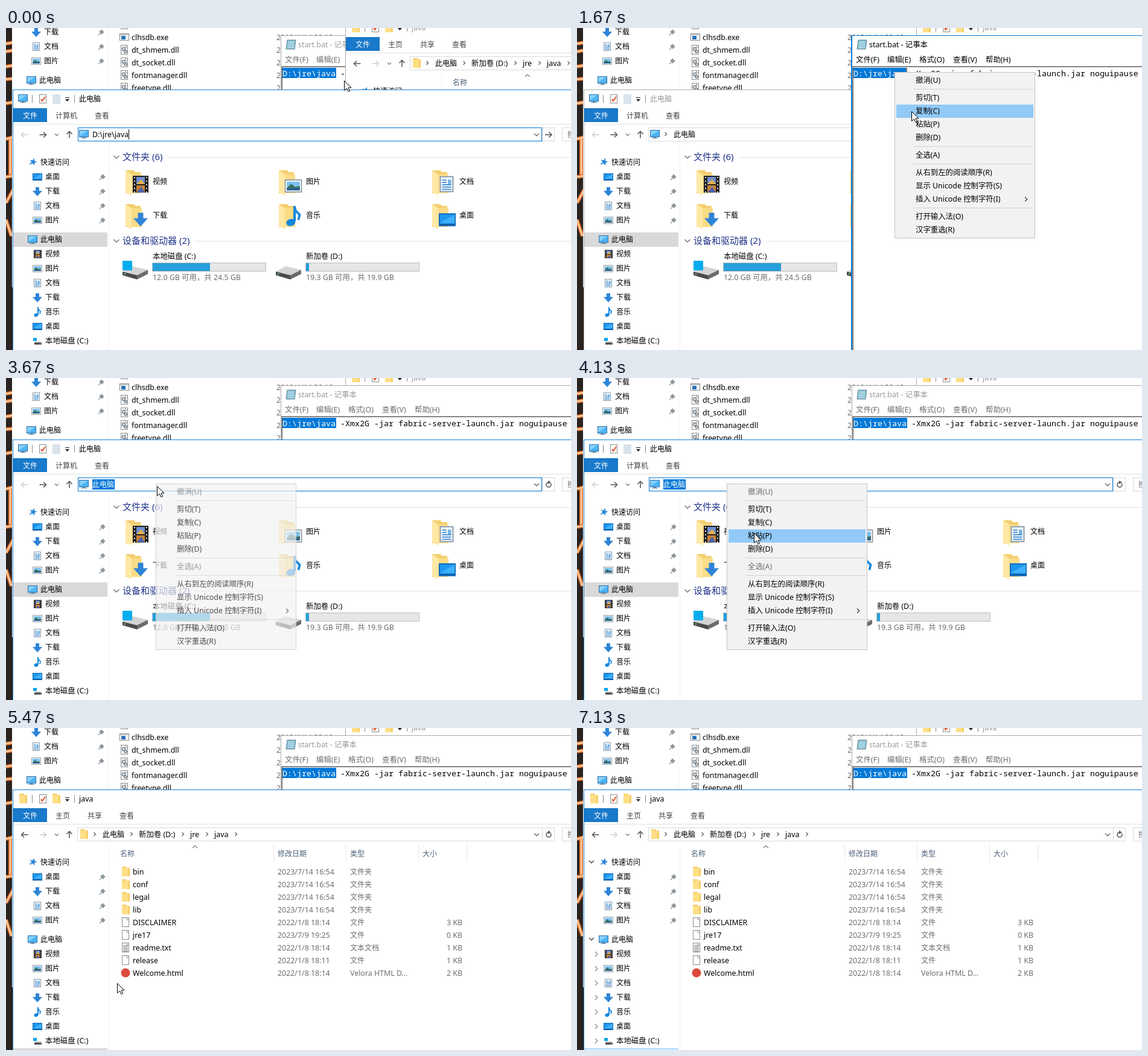
Write an HTML page with a canvas that moves like this. It is 936x534 px and loops after 7.47 s.

```html
<!DOCTYPE html>
<html lang="zh-CN">
<head>
<meta charset="utf-8">
<style>
html, body { margin: 0; width: 100%; height: 100%; overflow: hidden; background: #fff; }
canvas { display: block; }
</style>
</head>
<body>
<canvas id="stage" width="936" height="534"></canvas>
<script>
const g = document.getElementById('stage').getContext('2d');
const LOOP = 7470, STEP = 200 / 3;
const BLUE = '#0078d7', GREY = '#6d6d6d', DARK = '#5a5a5a';
const SANS = '"Noto Sans", "Open Sans", "Noto Sans CJK SC", "Noto Sans CJK", sans-serif';

// drawing helpers
function rect(x, y, w, h, c) { g.fillStyle = c; g.fillRect(x, y, w, h); }
function frame(x, y, w, h, c, fill) {
  if (fill) rect(x, y, w, h, fill);
  g.strokeStyle = c; g.lineWidth = 1;
  g.strokeRect(x + .5, y + .5, w - 1, h - 1);
}
function path(p) {
  g.beginPath();
  for (let i = 0; i < p.length; i += 2) g.lineTo(p[i], p[i + 1]);
}
function line(p, c, w = 1) { path(p); g.strokeStyle = c; g.lineWidth = w; g.stroke(); }
function poly(p, c) { path(p); g.fillStyle = c; g.fill(); }
function disc(x, y, r, c) { g.beginPath(); g.arc(x, y, r, 0, 7); g.fillStyle = c; g.fill(); }
function text(s, x, y, c = '#000', size, align = 'left') {
  g.font = (size || (/[ -~]/.test(s) ? 12.4 : 12)) + 'px ' + SANS;
  g.textAlign = align;
  g.fillStyle = c;
  g.fillText(s, x, y + 5);
}
function at(x, y, k, draw) {
  g.save(); g.translate(x, y); g.scale(k, k); draw(); g.restore();
}
const right = (x, y, c = DARK, r = 3) => line([x - r / 2, y - r, x + r / 2, y, x - r / 2, y + r], c, 1.2);
const down = (x, y, c = DARK, r = 4) => line([x - r, y - r / 2, x, y + r / 2, x + r, y - r / 2], c, 1.2);
const up = (x, y, c = DARK, r = 4) => down(x, y, c, -r);

// icons centred on the origin
const icons = {
  pc() {
    frame(-8, -7, 16, 12, '#2b6ea8', '#4db4f5');
    poly([-7, -6, 7, -6, -7, 3], '#86d0fb');
    rect(-2, 5, 4, 2, '#7c97ad'); rect(-5, 6, 10, 1, '#5d7c96');
  },
  desk() {
    frame(-8, -6, 16, 12, '#1267b5', '#1b97f0');
    poly([-7, 3, 7, -5, 7, 3], '#3fb0fa');
    rect(-7, 4, 14, 1, '#0b4f94');
  },
  down() { poly([-3, -7, 3, -7, 3, -1, 8, -1, 0, 8, -8, -1, -3, -1], '#2f84d8'); },
  doc() {
    frame(-6, -7, 12, 14, '#8296a8', '#fff');
    for (let y = -4; y < 6; y += 2) rect(-4, y, y < 0 ? 4 : 8, 1, '#3d8bd0');
    rect(1, -4, 3, 4, '#77b5e6');
  },
  pic() {
    frame(-8, -6, 16, 12, '#909aa2', '#fff');
    rect(-6, -4, 12, 8, '#7cc0ee');
    poly([-6, 2, -2, -2, 2, 1, 6, 0, 6, 4, -6, 4], '#3d7057');
    rect(-6, 2, 12, 2, '#28629c');
  },
  film() {
    rect(-6, -7, 13, 14, '#222');
    rect(-3, -6, 7, 6, '#6f8fd6'); rect(-3, 1, 7, 6, '#c98434');
    poly([-3, 0, 1, -4, 4, 0], '#e4b04c'); poly([-3, 7, 1, 2, 4, 7], '#4c63a8');
    for (let y = -6; y < 7; y += 3) { rect(-5, y, 1, 1, '#ddd'); rect(5, y, 1, 1, '#ddd'); }
  },
  note() {
    line([1, -8, 1, 4], '#1687dc', 2);
    line([1, -7, 2, -4, 5, -1, 4, 3], '#1687dc', 1.8);
    g.beginPath(); g.ellipse(-2, 5, 3.6, 2.8, -.3, 0, 7); g.fillStyle = '#1687dc'; g.fill();
  },
  star() {
    const p = [];
    for (let i = 0; i < 10; i++) {
      const a = i * Math.PI / 5 - 1.3, r = i % 2 ? 2.8 : 6.5;
      p.push(r * Math.cos(a), r * Math.sin(a));
    }
    poly(p, '#2a87d8');
    line([-7, 3, -3, 2], '#7db8e8'); line([-6, 5, -3, 4], '#7db8e8');
  },
  folder() {
    rect(-6, -8, 8, 4, '#f3cd68'); rect(-6, -6, 13, 14, '#ffdf86');
    rect(4, -6, 3, 14, '#f6cf68');
  },
  page() { frame(-6, -8, 12, 16, '#8c8c8c', '#fff'); line([2, -8, 2, -4, 6, -4], '#8c8c8c'); },
  txt() { icons.page(); for (let y = -4; y < 7; y += 2) rect(-4, y, 8, 1, '#8a8a8a'); },
  gear() {
    icons.page();
    g.strokeStyle = '#858f98'; g.lineWidth = 2;
    g.beginPath(); g.arc(-1, -1, 2.4, 0, 7); g.stroke();
    g.beginPath(); g.arc(2, 3, 2, 0, 7); g.stroke();
  },
  exe() { frame(-8, -6, 16, 12, '#8a8a8a', '#fff'); rect(-7, -5, 14, 2, '#c8c8c8'); rect(-5, -2, 7, 6, '#2b72b8'); },
  web() { disc(0, 0, 7.5, '#dd4b3e'); },
  check() {
    frame(-6, -7, 12, 15, '#8d8d8d', '#fff');
    line([-3, 1, -1, 4, 4, -3], '#e0502a', 2);
  },
  pin() {
    poly([0, -5, 5, 0, 3, 1, 1, 4, -4, -1, -1, -3], '#8d969d');
    line([-1, 1, -5, 5], '#8d969d', 1.3);
  },
  disk() {
    rect(-7, -5, 6, 5, '#00a3e8');
    poly([-6, 1, 5, 1, 7, 3, -4, 3], '#b8b8b8'); rect(-5, 3, 12, 3, '#4a4a4a');
    rect(4, 4, 2, 1, '#5fd35f');
  },
  drive() {
    poly([-20, 0, -4, -9, 22, -3, 4, 6], '#d4d4d4');
    poly([-20, 0, 4, 6, 4, 13, -20, 6], '#4a4a4a');
    poly([4, 6, 22, -3, 22, 4, 4, 13], '#6b6b6b');
    disc(-16, 4, 1.2, '#6be06b');
  },
  bigFolder() {
    poly([-18, -20, -4, -20, -2, -17, 7, -17, 7, 18, -18, 18], '#f4cf70');
    poly([-18, -20, -8, -13, -8, 22, -18, 16], '#ffe8a4');
    rect(-8, -13, 17, 31, '#fbdc86');
  }
};
const icon = (name, x, y, k = 1) => at(x, y, k, icons[name]);

const quick = [['desk', '桌面'], ['down', '下载'], ['doc', '文档'], ['pic', '图片']];
const places = [['film', '视频'], ['pic', '图片'], ['doc', '文档'], ['down', '下载'],
  ['note', '音乐'], ['desk', '桌面'], ['disk', '本地磁盘 (C:)']];

function sidebar(s) {
  if (s.pcRow) rect(12, 339, 156, 24, '#d9d9d9');
  icon('star', 45, 222); text('快速访问', 57, 222);
  quick.forEach(([n, label], i) => {
    const y = 246 + i * 24;
    icon(n, 52, y + 1); text(label, 65, y); icon('pin', 160, y + 1);
  });
  icon('pc', 44, 351); text('此电脑', 57, 350);
  places.forEach(([n, label], i) => {
    const y = 374 + i * 24;
    icon(n, 52, y + 1); text(label, 65, y);
  });
  rect(170, 195, 1, 400, '#f1f1f1');
  if (s.chev) {
    g.globalAlpha = s.chev;
    down(24, 222, '#333'); down(24, 350, '#333');
    places.forEach((_, i) => right(32, 375 + i * 24, '#8a8a8a', 4));
    g.globalAlpha = 1;
  }
  if (s.java) {
    rect(12, 531, 156, 10, s.hot ? '#cce8ff' : '#d9d9d9');
    if (s.hot) rect(12, 531, 156, 1, '#99d1ff');
  }
}

function group(label, y, x) {
  down(183, y, '#666', 4.5);
  text(label, 193, y, '#1e3287', 15);
  rect(x, y, 800, 1, '#e2e2e2');
}

function drive(x, label, used, info) {
  icon('drive', x - 29, 404);
  text(label, x + 1, 378);
  frame(x, 389, 189, 15, '#bcbcbc', '#e6e6e6');
  rect(x + 1, 390, used, 13, '#26a0da');
  text(info, x + 1, 413, GREY);
}

function pcView() {
  group('文件夹 (6)', 214, 268);
  [['film', '视频', 6, 3, 2], ['pic', '图片', 6, 6, 1.8], ['doc', '文档', 6, 3, 1.9],
   ['down', '下载', 7, 5, 1.5], ['note', '音乐', 6, 0, 2.1], ['desk', '桌面', 7, 6, 1.75]
  ].forEach(([n, label, dx, dy, k], i) => {
    const x = 216 + i % 3 * 254, y = 256 + (i > 2 ? 56 : 0);
    icon('bigFolder', x, y);
    icon(n, x + dx, y + dy, k);
    text(label, x + 27, y - 2);
  });
  group('设备和驱动器 (2)', 353, 312);
  drive(242, '本地磁盘 (C:)', 95, '12.0 GB 可用，共 24.5 GB');
  rect(193, 386, 16, 16, '#00adef');
  drive(496, '新加卷 (D:)', 5, '19.3 GB 可用，共 19.9 GB');
}

const files = [
  ['folder', 'bin', '2023/7/14 16:54', '文件夹', ''],
  ['folder', 'conf', '2023/7/14 16:54', '文件夹', ''],
  ['folder', 'legal', '2023/7/14 16:54', '文件夹', ''],
  ['folder', 'lib', '2023/7/14 16:54', '文件夹', ''],
  ['page', 'DISCLAIMER', '2022/1/8 18:14', '文件', '3 KB'],
  ['page', 'jre17', '2023/7/9 19:25', '文件', '0 KB'],
  ['txt', 'readme.txt', '2022/1/8 18:14', '文本文档', '1 KB'],
  ['page', 'release', '2022/1/8 18:11', '文件', '1 KB'],
  ['web', 'Welcome.html', '2022/1/8 18:14', 'Velora HTML D...', '2 KB']];

function listView(s) {
  if (s.head) {
    rect(172, 195, 271, 27, '#d9ebf9');
    rect(428, 195, 1, 27, '#a9cfec'); rect(443, 195, 1, 27, '#a9cfec');
    down(435.5, 208, DARK, 3);
  }
  up(313, 197, '#777');
  [['名称', 189], ['修改日期', 450], ['类型', 570], ['大小', 690]].forEach(([h, x]) => text(h, x, 208, '#4c607a'));
  [443, 563, 683, 763].forEach(x => rect(x, 194, 1, 28, '#e5e5e5'));
  files.forEach(([n, name, date, type, size], i) => {
    const y = 238 + i * 21;
    icon(n, 198, y);
    text(name, 210, y);
    text(date, 450, y, GREY);
    text(type, 570, y, GREY);
    text(size, 756, y, GREY, 0, 'right');
  });
}

function arrow(x, y, dir, c) {
  at(x, y, 1, () => {
    g.rotate(dir);
    line([-5.5, 0, 5.5, 0], c, 1.6); line([1, -4.5, 5.5, 0, 1, 4.5], c, 1.6);
  });
}

function address(s) {
  const focus = s.addr !== 'idle';
  if (focus) frame(119, 165, 769, 23, BLUE, '#fff');
  else frame(118, 165, 771, 23, '#d9d9d9', '#fff');
  icon(s.java ? 'folder' : 'pc', 129, 176);
  if (s.addr === 'typed') {
    text('D:\\jre\\java', 143, 176);
    rect(203, 168, 1, 17, '#000');
  } else if (s.addr === 'sel') {
    rect(143, 168, 37, 17, BLUE);
    text('此电脑', 143, 176, '#fff');
  } else {
    right(147, 176); text('此电脑', 160, 176);
    if (s.java) {
      right(208, 176); text('新加卷 (D:)', 220, 176);
      right(293, 176); text('jre', 305, 176);
      right(333, 176); text('java', 345, 176);
      right(381, 176);
    }
  }
  down(879, 177);
  frame(888, 165, 21, 23, '#d9d9d9');
  if (s.addr === 'typed') arrow(898.5, 177, 0, DARK);
  else {
    g.beginPath(); g.arc(899, 177, 4, -.6, 4.9); g.strokeStyle = DARK; g.lineWidth = 1.5; g.stroke();
    poly([898, 170, 903, 173, 898, 176], DARK);
  }
  if (focus) rect(887, 165, 1, 23, BLUE);
  frame(921, 165, 300, 23, '#d9d9d9');
  text('搜索', 930, 176, GREY);
}

function explorer(s, dx = 0, dy = 0) {
  g.save();
  g.translate(dx, dy);
  frame(11, 102, 1200, 700, s.active ? '#1883d7' : '#aaa', '#fff');
  icon(s.java ? 'folder' : 'pc', 28, 117);
  rect(43, 111, 1, 13, '#888'); rect(113, 111, 1, 13, '#888');
  icon('check', 61, 117);
  if (s.java) icon('folder', 83, 117); else rect(77, 110, 13, 16, '#d9e3ec');
  rect(98, 115, 7, 1, '#222'); poly([98, 118, 105, 118, 101.5, 122], '#222');
  text(s.java ? 'java' : '此电脑', 121, 117, s.active ? '#000' : '#999');
  rect(12, 133, 56, 23, '#1979ca');
  text('文件', 28, 145, '#fff');
  (s.java ? [['主页', 82], ['共享', 135], ['查看', 188]] : [['计算机', 82], ['查看', 147]])
    .forEach(([m, x]) => text(m, x, 145, '#444'));
  rect(12, 159, 1000, 1, '#dfe0e1');
  arrow(31, 177, Math.PI, s.java ? DARK : '#d0d0d0');
  arrow(61, 177, 0, s.java ? '#d0d0d0' : DARK);
  down(84, 177, '#777', 3);
  arrow(105, 177, -Math.PI / 2, DARK);
  address(s);
  sidebar(s);
  if (!s.java) pcView(); else if (!s.blank) listView(s);
  g.restore();
}

function backdrop() {
  rect(0, 0, 12, 534, '#2a2320');
  [[0, 26, 12, 24], [0, 39, 12, 37], [0, 64, 12, 62], [0, 85, 12, 84], [0, 125, 12, 123],
   [0, 184, 12, 181], [7, 184, 7, 245], [0, 247, 12, 245], [0, 290, 12, 268], [0, 318, 9, 345]].forEach(p => {
    line(p, '#e5722f', 6); line(p, '#fdd0a4', 2.5);
  });
  rect(10, 0, 700, 430, '#fff');
  at(-2, -264, 1, () => sidebar({}));
  text('2019/4/14 20:10', 448, 15, GREY);
  ['clhsdb.exe', 'dt_shmem.dll', 'dt_socket.dll', 'fontmanager.dll', 'freetype.dll'].forEach((f, i) => {
    const y = 15 + i * 21;
    icon(i ? 'gear' : 'exe', 196, y);
    text(f, 208, y);
    if (i) text('2019/4/14 20:10', 448, y, GREY);
  });
  icon('gear', 196, -6);
}

function notepad(active) {
  const c = active ? '#000' : GREY;
  frame(455, 12, 700, 700, active ? BLUE : '#aaa', '#fff');
  if (active) rect(454, 12, 1, 530, BLUE);
  poly([466, 20, 480, 20, 478, 35, 464, 35], '#8cc4d8');
  line([466, 20, 480, 20, 478, 35, 464, 35, 466, 20], '#5b7f8f');
  for (let y = 23; y < 33; y += 3) line([467, y + .5, 477, y + .5], '#c9e6f0');
  text('start.bat - 记事本', 484, 27, active ? '#000' : '#999');
  [['文件(F)', 462], ['编辑(E)', 514], ['格式(O)', 567], ['查看(V)', 623], ['帮助(H)', 677]]
    .forEach(([m, x]) => text(m, x, 52, c));
  // sunken edge of the text area
  frame(456, 63, 690, 640, '#a0a0a0');
  frame(457, 64, 690, 640, '#696969');
  rect(458, 66, 89, 17, BLUE);
  g.font = '13.333px "Noto Sans Mono", "Liberation Mono", monospace';
  g.textAlign = 'left';
  g.fillStyle = '#fff'; g.fillText('D:\\jre\\java', 458, 80);
  g.fillStyle = '#000'; g.fillText('-Xmx2G -jar fabric-server-launch.jar noguipause', 554, 80);
  if (active) rect(546, 66, 1, 17, '#ff8728');
}

const items = [['撤消(U)', 13], ['剪切(T)', 42], ['复制(C)', 64], ['粘贴(P)', 86], ['删除(D)', 108],
  ['全选(A)', 137], ['从右到左的阅读顺序(R)', 166], ['显示 Unicode 控制字符(S)', 188],
  ['插入 Unicode 控制字符(I)', 210], ['打开输入法(O)', 239], ['汉字重选(R)', 261]];

function menu(x, y, cur, off, alpha) {
  g.globalAlpha = Math.min(1, alpha);
  frame(x - 1, y, 233, 276, '#c4c4c4', '#f2f2f2');
  [28, 123, 152, 225].forEach(d => rect(x + 30, y + d, 199, 1, '#d2d2d2'));
  items.forEach(([label, d]) => {
    const dim = off.includes(label[0]);
    if (!dim && Math.abs(cur.y - y - d) < 11) rect(x + 2, y + d - 10, 227, 22, '#91c9f7');
    text(label, x + 34, y + d, dim ? GREY : '#000');
  });
  right(x + 217, y + 211, '#333', 3.5);
  g.globalAlpha = 1;
}

// pointer route: time, x, y
const route = [[0, 560, 87], [400, 540, 36], [733, 527, 73], [1133, 527, 73], [1667, 554, 138], [1800, 554, 138],
  [2600, 292, 181], [3000, 292, 181], [3333, 248, 175], [3600, 248, 175], [4133, 293, 257], [5133, 293, 257],
  [5467, 184, 423], [5600, 130, 540], [6133, 130, 540], [6400, 250, 132], [6533, 211, 258], [6800, 120, 540], [LOOP, 120, 540]];

function pointer(t) {
  const i = route.findIndex((k, n) => n && t <= k[0]);
  const [a, x, y] = route[i - 1], [b, u, v] = route[i];
  let p = (t - a) / (b - a);
  p = p * p * (3 - 2 * p);
  return { x: Math.round(x + (u - x) * p), y: Math.round(y + (v - y) * p) };
}

function drawPointer({ x, y }, beam) {
  if (beam) {
    line([x - 3, y - 7.5, x, y - 7.5, x + .5, y - 6.5, x + 1, y - 7.5, x + 4, y - 7.5], '#000');
    line([x - 3, y + 7.5, x, y + 7.5, x + .5, y + 6.5, x + 1, y + 7.5, x + 4, y + 7.5], '#000');
    rect(x, y - 7, 1, 14, '#000');
  } else {
    at(x + .5, y + .5, 1, () => {
      const p = [0, 0, 0, 16, 4, 12.5, 6.5, 18, 9, 17, 6.5, 11.5, 11.5, 11.5, 0, 0];
      poly(p, '#fff'); line(p, '#000');
    });
  }
}

function draw(t) {
  const on = (a, b) => t >= a - 4 && t < b - 4;
  const cur = pointer(t);
  const noteTop = on(400, 2600), java = t > 4920;
  const copying = on(1133, 1867), pasting = on(3600, 4333);
  const state = {
    java, pcRow: !java, active: !on(400, 2667),
    addr: java || on(400, 2667) ? 'idle' : on(2667, 4333) ? 'sel' : 'typed',
    blank: on(4933, 5000),
    head: on(6330, 6700),
    hot: on(5600, 6200) || t > 6990,
    chev: on(5600, 6200) ? 1 : on(6200, 7000) ? .75 : t > 6990 ? Math.min(1, .8 + (t - 7000) / 660) : 0
  };
  const behind = () => explorer({ java: true, addr: 'idle' }, 551, -118);
  backdrop();
  if (t < 396) { notepad(false); behind(); explorer(state); }
  else {
    behind();
    if (noteTop) { explorer(state); notepad(true); }
    else { notepad(false); explorer(state); }
  }
  if (copying) menu(527, 73, cur, '', (t - 1060) / 200);
  if (pasting) menu(249, 175, cur, '撤全', (t - 3530) / 200);
  const inNote = noteTop && cur.x > 457 && cur.y > 64;
  const inBar = on(2600, 4333) && cur.y < 188;
  if (!on(4600, 5200)) drawPointer(cur, !copying && !pasting && (inNote || inBar));
}

function tick() {
  const t = performance.now() % LOOP;
  draw(Math.floor((t + 3.4) / STEP) * STEP);
  requestAnimationFrame(tick);
}
tick();
</script>
</body>
</html>
```
